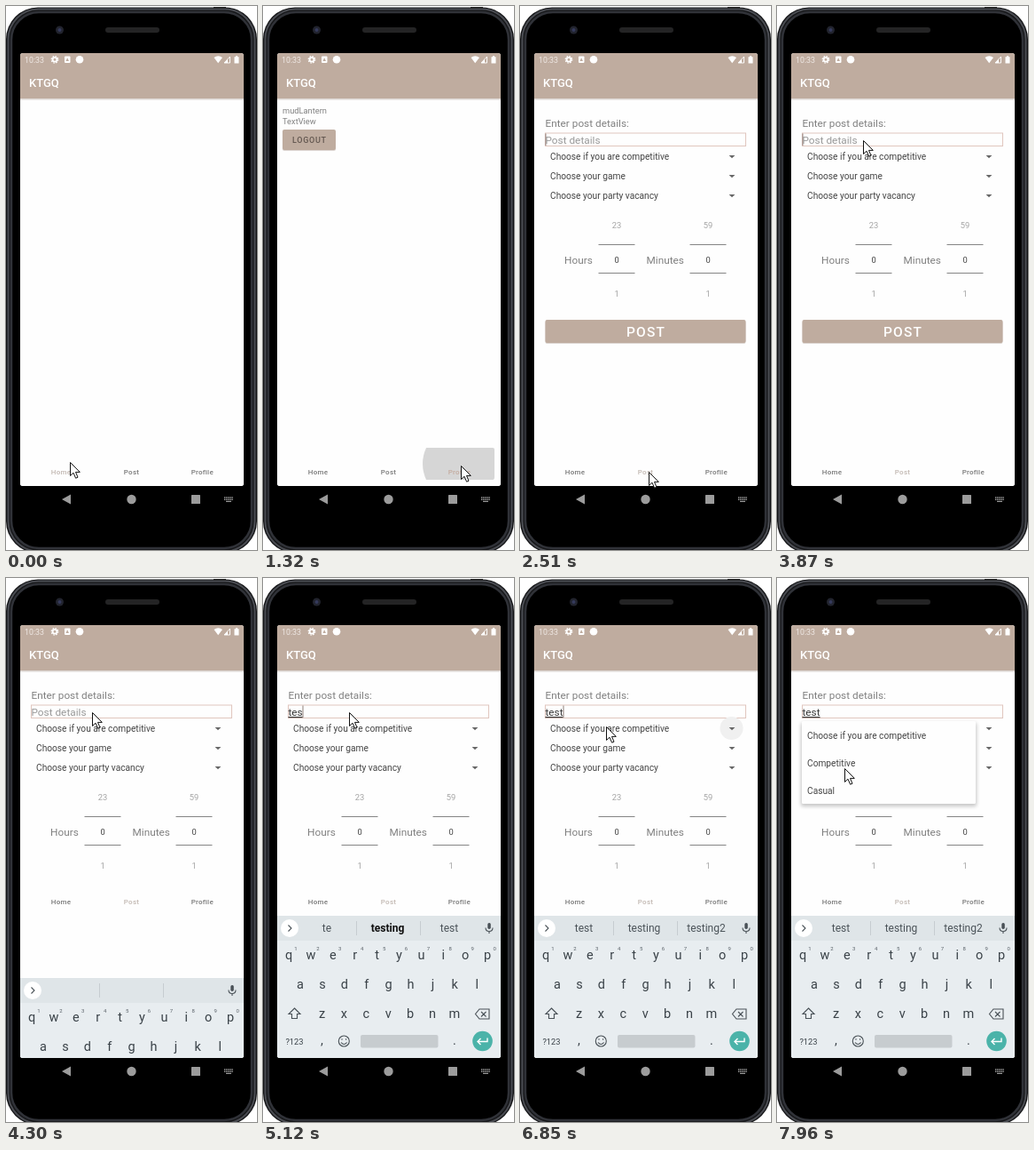
These frames come from a looping animation (283x612 px, 8000 ms). An HTML page:

```html
<!DOCTYPE html>
<html lang="en">
<head>
<meta charset="utf-8">
<title>Post form on a phone</title>
<style>
html, body { margin: 0; width: 283px; height: 612px; overflow: hidden; background: #fff; }
svg { display: block; font: 11.8px Roboto, sans-serif; }
.mid { text-anchor: middle; }
.tan { fill: #bfac9f; }
.grey { fill: #808080; }
.small { font-size: 9.3px; }
.faint { fill: #a3a3a3; }
.item { font-size: 10.2px; fill: #444; }
.label { font-size: 8px; font-weight: 500; letter-spacing: .25px; fill: #7a7a7a; }
.key { font-size: 14.5px; fill: #3a4248; }
.hint { font-size: 6px; fill: #596168; }
.line { fill: none; stroke: #495157; stroke-width: 1.1; }
.typed { fill: #383838; text-decoration: underline; }
.typed, .words, .hide { opacity: 0; }

.a { animation: 8s step-end infinite; }
#cursor { animation-name: cursor; }
#home { animation-name: home; }
#post { animation-name: post; }
#profile { animation-name: profile; }
#profilePage { animation-name: profile-page; }
#postPage { animation-name: post-page; }
#profilePress { animation-name: profile-press; }
#postPress { animation-name: post-press; }
#tabs { animation-name: tabs; }
#keyboard { animation-name: keyboard; }
#caret { animation-name: caret; }
#prompt { animation-name: prompt; }
#typed1 { animation-name: typed1; }
#typed2 { animation-name: typed2; }
#typed3 { animation-name: typed3; }
#typed4 { animation-name: typed4; }
#words1 { animation-name: typed2; }
#words2 { animation-name: typed3; }
#words3 { animation-name: words3; }
#words4 { animation-name: words4; }
#arrowPress { animation-name: arrow-press; }
#menu { animation-name: menu; }

@keyframes cursor {
  0% { transform: translate(72px, 513px); }
  1.48% { transform: translate(82px, 516px); }
  3.1% { transform: translate(105px, 521px); }
  4.85% { transform: translate(134px, 525px); }
  6.48% { transform: translate(164px, 527px); }
  8.1% { transform: translate(193px, 527px); }
  9.73% { transform: translate(217px, 525px); }
  11.35% { transform: translate(229px, 521px); }
  13.1% { transform: translate(223px, 517px); }
  19.48% { transform: translate(212px, 519px); }
  20.98% { transform: translate(193px, 523px); }
  22.48% { transform: translate(164px, 525px); }
  23.98% { transform: translate(145px, 524px); }
  33.1% { transform: translate(144px, 500px); }
  34.73% { transform: translate(136px, 420px); }
  36.35% { transform: translate(123px, 300px); }
  37.98% { transform: translate(108px, 190px); }
  39.48% { transform: translate(98px, 146px); }
  41.1% { transform: translate(97px, 144px); }
  42.98% { transform: translate(97px, 148px); }
  44.85% { transform: translate(97px, 151px); }
  72.35% { transform: translate(97px, 155px); }
  73.85% { transform: translate(97px, 162px); }
  75.35% { transform: translate(97px, 167px); }
  92.85% { transform: translate(96px, 174px); }
  94.48% { transform: translate(92px, 198px); }
  96.1% { transform: translate(86px, 223px); }
  97.85% { transform: translate(80px, 222px); }
  99.48%, 100% { transform: translate(76px, 214px); }
}
@keyframes home { 0% { fill: #c3b9b3; } 14.98%, 100% { fill: #7a7a7a; } }
@keyframes profile { 0% { fill: #7a7a7a; } 14.98% { fill: #c5aca0; } 27.6%, 100% { fill: #7a7a7a; } }
@keyframes post { 0% { fill: #7a7a7a; } 27.6%, 100% { fill: #c3b9b3; } }
@keyframes profile-page { 0% { opacity: 0; } 14.98% { opacity: 1; } 27.6%, 100% { opacity: 0; } }
@keyframes post-page { 0% { opacity: 0; } 27.6%, 100% { opacity: 1; } }
@keyframes profile-press {
  0% { opacity: 0; } 14.98% { opacity: .6; } 16.48% { opacity: 1; }
  17.98% { opacity: .5; } 19.48%, 100% { opacity: 0; }
}
@keyframes post-press {
  0% { opacity: 0; } 27.6% { opacity: 1; } 29.48% { opacity: .5; } 31.35%, 100% { opacity: 0; }
}
@keyframes tabs { 0% { transform: none; } 53.73%, 100% { transform: translateY(-160px); } }
@keyframes keyboard {
  0% { transform: translateY(160px); } 53.73% { transform: translateY(70px); } 55.6%, 100% { transform: none; }
}
@keyframes caret {
  0% { opacity: 0; } 27.6% { opacity: 1; } 39.48% { opacity: 0; }
  48.35% { opacity: 1; } 53.73% { opacity: 0; }
  60.6% { opacity: 1; transform: translateX(4px); }
  62.23% { opacity: 1; transform: translateX(10px); }
  63.98% { opacity: 1; transform: translateX(16px); }
  65.48% { opacity: 1; transform: translateX(20px); }
  72.35% { opacity: 0; transform: translateX(20px); }
  79.1% { opacity: 1; transform: translateX(20px); }
  87.48%, 100% { opacity: 0; transform: translateX(20px); }
}
@keyframes prompt { 0% { opacity: 1; } 60.6%, 100% { opacity: 0; } }
@keyframes typed1 { 0% { opacity: 0; } 60.6% { opacity: 1; } 62.23%, 100% { opacity: 0; } }
@keyframes typed2 { 0% { opacity: 0; } 62.23% { opacity: 1; } 63.98%, 100% { opacity: 0; } }
@keyframes typed3 { 0% { opacity: 0; } 63.98% { opacity: 1; } 65.48%, 100% { opacity: 0; } }
@keyframes typed4 { 0% { opacity: 0; } 65.48%, 100% { opacity: 1; } }
@keyframes words3 { 0% { opacity: 0; } 65.48% { opacity: 1; } 66.98%, 100% { opacity: 0; } }
@keyframes words4 { 0% { opacity: 0; } 66.98%, 100% { opacity: 1; } }
@keyframes arrow-press {
  0% { opacity: 0; } 82.1% { opacity: .4; } 83.85% { opacity: .75; }
  85.6% { opacity: 1; } 89.35%, 100% { opacity: 0; }
}
@keyframes menu { 0% { opacity: 0; } 87.48% { opacity: .6; } 89.35%, 100% { opacity: 1; } }
</style>
</head>
<body>
<svg width="283" height="612" viewBox="0 0 283 612">
  <defs>
    <clipPath id="screen"><rect x="16" y="53" width="252" height="487" rx="3"/></clipPath>
    <filter id="soft" x="-10%" y="-10%" width="120%" height="130%"><feGaussianBlur stdDeviation="2.2"/></filter>
    <path id="press" d="M184 497H259q2 0 2 2V530q0 3-2 3H184Q176 515 184 497Z" fill="#d6d6d6"/>
    <path id="drop" d="M-3.4-1.6H3.4L0 1.8Z" fill="#666"/>
    <g id="wheel">
      <path d="M-20.5 268.5H20.5M-20.5 300.5H20.5" stroke="#858585" stroke-width="1.2"/>
      <text class="mid small" y="289" fill="#444">0</text>
      <text class="mid small faint" y="327">1</text>
    </g>
  </defs>

  <!-- phone body -->
  <rect y="1.5" width="283" height="614" rx="36" fill="#151618"/>
  <rect x="2.5" y="3.5" width="278" height="610" rx="34" fill="none" stroke="#4a4c52" stroke-width="2"/>
  <rect x="6" y="7" width="271" height="603" rx="31" fill="#000" stroke="#303238" stroke-width="2.5"/>
  <rect x="234" y="1" width="14" height="1.5" fill="#222"/>
  <circle cx="60.5" cy="27" r="4.5" fill="#22242e"/>
  <circle cx="60.5" cy="27" r="2" fill="#353a5c"/>
  <rect x="112" y="24" width="61" height="6" rx="3" fill="#242425"/>

  <g clip-path="url(#screen)">
    <rect x="16" y="53" width="252" height="487" fill="#fefefe"/>
    <rect x="16" y="104" width="252" height="1.5" fill="#dcd6d2"/>
    <rect class="tan" x="16" y="53" width="252" height="51"/>
    <g fill="#fff">
      <text x="21" y="64" font-size="8.8" fill="#f0e9e5">10:33</text>
      <circle cx="55" cy="60.3" r="2.4" fill="none" stroke="#fff" stroke-width="1.8"/>
      <circle cx="55" cy="60.3" r="3.8" fill="none" stroke="#fff" stroke-width="1.2" stroke-dasharray="1.6 1.38"/>
      <rect x="66" y="56.5" width="6.5" height="7.5" rx="1"/>
      <path class="tan" d="M69.2 58.2L71 62H67.4Z"/>
      <circle cx="83" cy="60.3" r="4.3"/>
      <path d="M234.5 58Q239.2 54.500 244 58L239.2 64.200Z"/>
      <path d="M246 64L252.500 57V64Z" fill="none" stroke="#fff" stroke-width=".9"/>
      <path d="M246 64L250 60V64Z"/>
      <path d="M257.500 57.200H259V56H261V57.200H262.500V64.500H257.500Z"/>
      <text x="26" y="91" font-size="13" font-weight="500">KTGQ</text>
    </g>

    <g id="profilePage" class="a hide">
      <g class="grey small">
        <text x="22" y="120.500">mudLantern</text>
        <text x="22" y="132.500">TextView</text>
      </g>
      <rect x="22" y="140" width="60" height="23" rx="2" fill="#ddd6d2"/>
      <rect class="tan" x="22" y="139" width="60" height="23" rx="2"/>
      <text class="mid" x="52.300" y="154" font-size="9" font-weight="500" letter-spacing=".7" fill="#62564f">LOGOUT</text>
    </g>

    <g id="postPage" class="a hide">
      <text class="grey" x="28.500" y="136">Enter post details:</text>
      <rect x="28.500" y="143" width="226" height="14.500" fill="none" stroke="#e0c6be"/>
      <text id="prompt" class="a" x="28.500" y="155" fill="#999">Post details</text>
      <text id="typed1" class="a typed" x="28.500" y="155">t</text>
      <text id="typed2" class="a typed" x="28.500" y="155">te</text>
      <text id="typed3" class="a typed" x="28.500" y="155">tes</text>
      <text id="typed4" class="a typed" x="28.500" y="155">test</text>
      <rect id="caret" class="a hide" x="28.500" y="143.500" width="1" height="13.500" fill="#8d7f78"/>
      <circle id="arrowPress" class="a hide" cx="238.500" cy="169" r="13" fill="#f0f0f0"/>
      <g class="item">
        <text x="34" y="173">Choose if you are competitive</text>
        <text x="34" y="195">Choose your game</text>
        <text x="34" y="217">Choose your party vacancy</text>
      </g>
      <use href="#drop" x="239" y="169.500"/>
      <use href="#drop" x="239" y="191.500"/>
      <use href="#drop" x="239" y="213.500"/>
      <text class="mid small faint" x="109" y="250">23</text>
      <text class="mid small faint" x="212" y="250">59</text>
      <use href="#wheel" x="109"/>
      <use href="#wheel" x="212"/>
      <text class="grey" x="50" y="289.500">Hours</text>
      <text class="grey" x="142.500" y="289.500">Minutes</text>
      <rect x="28.500" y="354" width="226" height="26" rx="2" fill="#ddd6d2"/>
      <rect class="tan" x="28.500" y="353" width="226" height="26" rx="2"/>
      <text class="mid" x="142" y="372" font-size="15.500" font-weight="500" letter-spacing="1.200" fill="#fff">POST</text>
      <g id="menu" class="a hide">
        <rect x="27" y="163" width="198" height="94" rx="2" fill="#000" opacity=".22" filter="url(#soft)"/>
        <rect x="28" y="161" width="196" height="93" rx="1.500" fill="#fefefe"/>
        <g class="item">
          <text x="34" y="181">Choose if you are competitive</text>
          <text x="34" y="212">Competitive</text>
          <text x="34" y="242.500">Casual</text>
        </g>
      </g>
    </g>

    <g id="tabs" class="a">
      <rect x="16" y="506" width="252" height="200" fill="#fefefe"/>
      <use id="profilePress" class="a hide" href="#press"/>
      <use id="postPress" class="a hide" href="#press" x="-80"/>
      <g class="mid label">
        <text id="home" class="a" x="62" y="526.500">Home</text>
        <text id="post" class="a" x="141.500" y="526.500">Post</text>
        <text id="profile" class="a" x="221.300" y="526.500">Profile</text>
      </g>
    </g>

    <g id="keyboard" class="a" transform="translate(0 160)">
      <rect x="16" y="380" width="252" height="160" fill="#e8edf0"/>
      <rect x="16" y="380" width="252" height="28" fill="#dfe5e8"/>
      <circle cx="30" cy="394" r="10" fill="#fff"/>
      <path class="line" d="M28.500 390.500L32 394L28.500 397.500"/>
      <path d="M105.500 386V402M177.500 386V402" stroke="#c6ccd0"/>
      <g class="mid" font-size="12" fill="#4b5359">
        <g id="words1" class="a words"><text x="72" y="398">t</text><text x="140" y="398">to</text><text x="210" y="398">the</text></g>
        <g id="words2" class="a words"><text x="72" y="398">te</text><text x="140.500" y="398" font-weight="700" fill="#111">testing</text><text x="210" y="398">test</text></g>
        <g id="words3" class="a words"><text x="72" y="398">tes</text><text x="140" y="398">test</text><text x="210" y="398">testing</text></g>
        <g id="words4" class="a words"><text x="72" y="398">test</text><text x="140" y="398">testing</text><text x="210" y="398">testing2</text></g>
      </g>
      <rect x="253.300" y="388" width="3.500" height="7" rx="1.700" fill="#495157"/>
      <path class="line" d="M251 393.500Q251 397.500 255 397.500T259 393.500M255 397.500V400"/>
      <g id="keys" class="mid"></g>
      <path class="line" d="M35.500 484L42 490.500H38.500V495.500H32.500V490.500H29Z"/>
      <path class="line" d="M244 485H255V496H244L239.500 490.500ZM246 488L251.500 493.500M251.500 488L246 493.500"/>
      <text class="mid" x="35.500" y="524.500" font-size="9.300" fill="#3a4248">?123</text>
      <text class="key mid" x="66.500" y="525">,</text>
      <circle class="line" cx="91.300" cy="521" r="6"/>
      <path class="line" d="M88 522.500Q91.300 526.500 94.600 522.500M89 518.200V519.800M93.600 518.200V519.800"/>
      <rect x="110" y="514" width="87.500" height="14.500" rx="2" fill="#c7cccf"/>
      <text class="key mid" x="216" y="525">.</text>
      <circle cx="247.500" cy="521" r="11.300" fill="#4bb3a9"/>
      <path d="M253 517.500V521.500H242.500M245.500 518L242 521.500L245.500 525" fill="none" stroke="#fff" stroke-width="1.400"/>
    </g>
  </g>

  <!-- system buttons -->
  <g fill="#9c9c9c">
    <path d="M63 555L73 549.500V560.500Z"/>
    <circle cx="141.500" cy="555" r="5.200"/>
    <rect x="209" y="550" width="10" height="10" rx=".5"/>
    <path d="M246 553H256M246 555.200H256" stroke="#9c9c9c" stroke-width="1.400" stroke-dasharray="1.400 .7"/>
    <path d="M248 556.800H254V558H248Z"/>
  </g>

  <path id="cursor" class="a" d="M.5 .5V15.500L4 12.200L6.600 18.200L9 17.200L6.500 11.400H11.300Z" fill="#fff" stroke="#111"/>
</svg>
<script>
const keys = document.getElementById("keys");
function addText(cls, x, y, str) {
  const el = document.createElementNS("http://www.w3.org/2000/svg", "text");
  el.setAttribute("class", cls);
  el.setAttribute("x", x);
  el.setAttribute("y", y);
  el.textContent = str;
  keys.append(el);
}
const pitch = 24.9;
[["qwertyuiop", 29, 429], ["asdfghjkl", 42, 461.5], ["zxcvbnm", 66.5, 494.5]].forEach(([row, x, y], r) => {
  [...row].forEach((ch, i) => {
    addText("key", x + i * pitch, y, ch);
    if (r === 0) addText("hint", x + i * pitch + 8, 419, (i + 1) % 10);
  });
});
</script>
</body>
</html>
```
